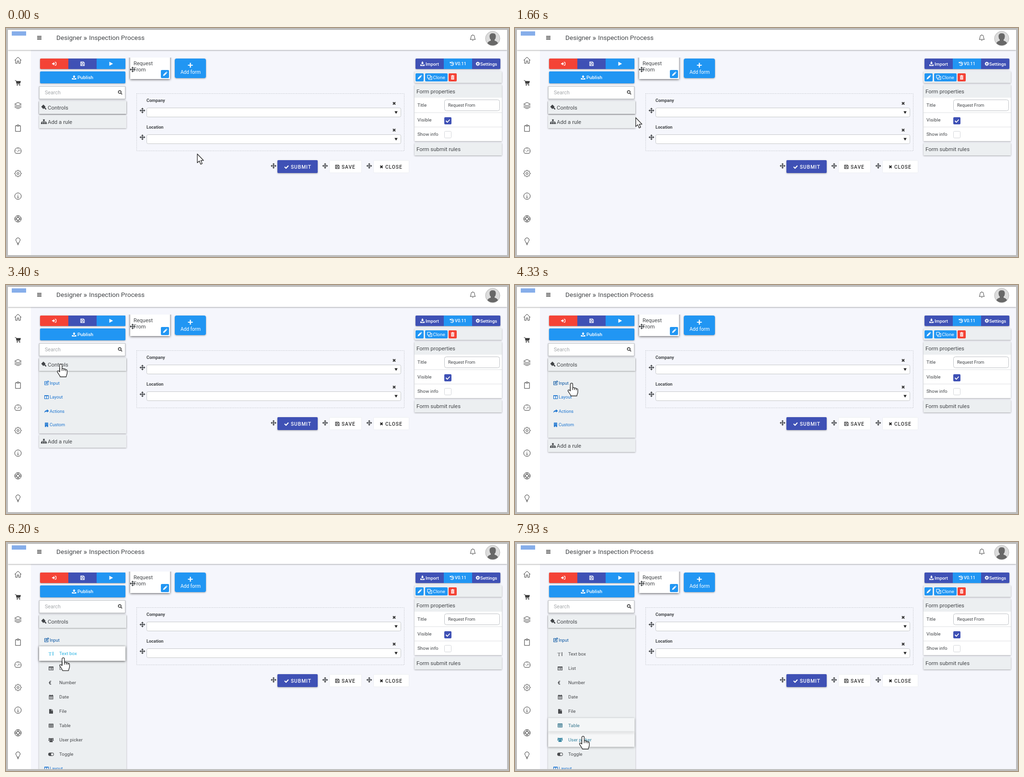
These frames come from a looping animation (1049 by 480 pixels, 8000 ms). An HTML page:

```html
<!DOCTYPE html>
<html lang="en">
<head>
<meta charset="utf-8">
<title>Form designer</title>
<style>
html, body { margin: 0; width: 100%; height: 100%; overflow: hidden; background: #bdbdbd; }
svg { display: block; width: 1049px; height: 480px; font-family: Roboto, sans-serif; }
.low { filter: drop-shadow(0 1px 1.5px #0005); }
.high { filter: drop-shadow(0 1px 2.5px #000a); }
</style>
</head>
<body>
<svg id="stage" viewBox="0 0 1049 480"></svg>
<script>
const RED = '#f44336', INDIGO = '#3f51b5', BLUE = '#2196f3', INK = '#424548', BAR = '#eceff1', LINK = '#1b74d0';

function gear(outer, inner, hole) {
  let d = '';
  for (let i = 0; i < 32; i++) {
    const a = (i - 0.5) * Math.PI / 16, r = i % 4 < 2 ? outer : inner;
    d += (i ? 'L' : 'M') + (r * Math.cos(a)).toFixed(2) + ' ' + (r * Math.sin(a)).toFixed(2);
  }
  return d + 'z' + ring(hole);
}
function ring(r, x = 0, y = 0) {
  return `M${x - r} ${y}a${r} ${r} 0 1 0 ${2 * r} 0a${r} ${r} 0 1 0 ${-2 * r} 0z`;
}

// Icon paths are centred on 0,0.
const icons = {
  move: 'M0-6l2.5 3h-1.7v2.2h2.2v-1.7l3 2.5-3 2.5v-1.7h-2.2v2.2h1.7l-2.5 3-2.5-3h1.7v-2.2h-2.2v1.7l-3-2.5 3-2.5v1.7h2.2v-2.2h-1.7z',
  cross: 'M-2.5-2.5l5 5m0-5l-5 5',
  plus: 'M-5 0h10M0-5v10',
  check: 'M-4 0l3 3 5-5.5',
  pencil: 'M-4 4l.8-3 5-5 2.2 2.2-5 5zM2.4-4.6l.9-.7 2 2-.7.9z',
  floppy: 'M-3.8-3.8h6l1.8 1.8v5.8h-7.8zM-2-3.8v2.6h3.6v-2.6M-2 3.8v-3h4v3',
  play: 'M-3.5-4.2L4.2 0-3.5 4.2z',
  enter: 'M-4.5-1h2.5v-2.5l3.8 3.5-3.8 3.5v-2.5h-2.5z',
  bracket: 'M1-3.4h1.5q1.5 0 1.5 1.5v3.8q0 1.5-1.5 1.5h-1.5',
  upload: 'M0-4.5l3 3.2h-1.8v2.8h-2.4v-2.8h-1.8zM-4.5 1.5h2.5v1.2h4v-1.2h2.5v3h-9z',
  download: 'M0 1.5l3-3.2h-1.8v-2.8h-2.4v2.8h-1.8zM-4.5 1.5h2.5v1.2h4v-1.2h2.5v3h-9z',
  history: 'M-3-2.4a3.7 3.7 0 1 1 0 4.8M-3.8-4v2.2h2.4M.2-2v2.3h2',
  cog: gear(4.6, 3.4, 1.5),
  clone: 'M-4.5-4.5h6v6h-6zM1.5-2h3v6.5h-6.5v-3',
  trash: 'M-3.7-3.7h2l.5-1h2.4l.5 1h2v1.2h-7.4zM-3-2h6v6.5h-6zM-1.3-.8v4h.7v-4zM.6-.8v4h.7v-4z',
  search: ring(2.9, -.8, -.8) + 'M1.5 1.5l2.6 2.6',
  gavel: 'M-5.5-1l4.5-4.5 4.5 4.5-1.2 1.2 3.2 3.5-1.6 1.6-3.4-3.4-1.6 2z',
  sitemap: 'M-1.7-5h3.4v3.2h-1.1v1.4h4.2v2h1.1v3.2h-3.4v-3.2h1.2v-1h-3.1v1h1.1v3.2h-3.4v-3.2h1.1v-1h-3.1v1h1.2v3.2h-3.4v-3.2h1.1v-2h4.2v-1.4h-1.1z',
  caret: 'M-3.2-2.5h6.4l-3.2 5.5z',
  edit: 'M1-3.3h-4.8v7h7v-3.5M-1.2 1.2l.3-1.8 4.1-4 1.5 1.5-4.1 4z',
  columns: 'M-4-3.5h8v7h-8zM-4-2.8h8M0-3.5v7',
  share: 'M1-4l4 3.4-4 3.4v-2q-4-.3-5.5 3 0-5.6 5.5-5.8z',
  building: 'M-3.4-4.5h6.8v9h-2.6v-2h-1.6v2h-2.6zM-2-3v1h1.2v-1zM.8-3v1h1.2v-1zM-2-.8v1h1.2v-1zM.8-.8v1h1.2v-1z',
  list: 'M-5-4h10v8h-10zM-4-1.8v4.8h8v-4.8zM-3.3-1h1.2v1h-1.2zM-1.3-1h4.5v1h-4.5zM-3.3 1h1.2v1h-1.2zM-1.3 1h4.5v1h-4.5z',
  date: 'M-4.5-3.7h1.5v-1.3h1.5v1.3h3v-1.3h1.5v1.3h1.5v8.4h-9zM-3.6-1.2v1.9h2v-1.9zM-1-1.2v1.9h2v-1.9zM1.6-1.2v1.9h2v-1.9zM-3.6 1.4v2.2h2v-2.2zM-1 1.4v2.2h2v-2.2zM1.6 1.4v2.2h2v-2.2z',
  file: 'M-4-4.8h4.5v3.2h3.5v6.4h-8zM1.3-4.8l2.7 2.5h-2.7z',
  table: 'M-4.5-3.7h9v7.4h-9zM-4.5-3h9M-4.5-1h9M-4.5 1.3h9M-1.5-3v6.7M1.5-3v6.7',
  users: ring(2.2, 0, -1.7) + ring(1.5, -3.7, -2.7) + ring(1.5, 3.7, -2.7) + 'M-3.4 4.5q-.3-4 2-4h2.8q2.3 0 2 4zM-5.6 1.5q-.2-2.6 1.4-2.6h1.8q.3 1-1.4 2.6zM5.6 1.5q.2-2.6-1.4-2.6h-1.8q-.3 1 1.4 2.6z',
  toggle: 'M-2.5-3.4h5a3.4 3.4 0 0 1 0 6.8h-5a3.4 3.4 0 0 1 0-6.8z' + ring(2.5, 2.4, 0),
  home: 'M-7 .5l7-7 7 7M-5-1v7.5h3.5v-5h3v5h3.5v-7.5',
  cart: 'M-6.5-5h2.3l1.8 7.3h6.5',
  basket: 'M-4-3.8h10l-1.4 5h-7.4z' + ring(1.2, -1.5, 4.5) + ring(1.2, 3.5, 4.5),
  layers: 'M0-6.5l7 3.6-7 3.6-7-3.6zM-7 .3l7 3.5 7-3.5M-7 3.2l7 3.5 7-3.5',
  board: 'M-2-5.2h-3.2v12h10.4v-12h-3.2M-2-6.8h4v2.6h-4z',
  gauge: 'M-4.5 5.4a6.8 6.8 0 1 1 9 0zM-1 2l4-4.5M-5-.5h1.4M0-5v1.4M3.6 0h1.4',
  settings: gear(7, 5.3, 2.2),
  info: ring(6.8) + 'M0-3.5v1.2M-1-.5h1v4M-1.3 3.5h2.6',
  buoy: ring(6.8) + ring(3) + 'M-1.5-6.5v4M1.5-6.5v4M-1.5 2.5v4M1.5 2.5v4M-6.5-1.5h4M-6.5 1.5h4M2.5-1.5h4M2.5 1.5h4',
  bulb: 'M-1.8 3.5q0-2-1.6-3.7a4.5 4.5 0 1 1 6.8 0q-1.6 1.7-1.6 3.7zM-1.8 5.2h3.6M-1 6.9h2',
  bell: 'M-5.5 3.5q1.8-1.5 1.8-5.5a3.7 3.7 0 0 1 7.4 0q0 4 1.8 5.5zM-1.3 5.3q1.3 1.3 2.6 0M0-5.8v-1',
  menu: 'M-4.5-3h9M-4.5 0h9M-4.5 3h9'
};

const rect = (x, y, w, h, fill, more = '') => `<rect x="${x}" y="${y}" width="${w}" height="${h}" fill="${fill}" ${more}/>`;
const text = (x, mid, size, str, fill = INK, more = '') =>
  `<text x="${x}" y="${mid + size * 0.355}" font-size="${size}" fill="${fill}" ${more}>${str}</text>`;
const icon = (name, x, y, color = INK, line = 0) =>
  `<path d="${icons[name]}" transform="translate(${x} ${y})" fill-rule="evenodd" ` +
  (line ? `fill="none" stroke="${color}" stroke-width="${line}" stroke-linejoin="round"/>` : `fill="${color}"/>`);
const clip = (id, x, y, w, h) => `<clipPath id="${id}">${rect(x, y, w, h, '#000', `id="${id}Box"`)}</clipPath>`;
const group = (id, body, more = '') => `<g id="${id}" ${more}>${body}</g>`;
const low = 'class="low"', medium = 'font-weight="500"', bold = 'font-weight="700"';
const spaced = medium + ' letter-spacing=".9"';

const sidebar = ['home', 'cart', 'layers', 'board', 'gauge', 'settings', 'info', 'buoy', 'bulb']
  .map((n, i) => icon(n, 25, 67.5 + i * 47.5, '#3a3a3a', 1)).join('') + icon('basket', 25, 115, '#3a3a3a');

const header = rect(4, 4, 1041, 42, '#fff', low) + rect(12, 7, 30, 9, '#86aeea') +
  icon('menu', 69.5, 20.5, '#333', 1.4) +
  text(105, 20.5, 13.6, 'Designer') + text(161.5, 20.5, 16, '»') + text(173.3, 20.5, 13.6, 'Inspection Process') +
  icon('bell', 973.5, 20.5, '#444', 1) +
  '<circle cx="1015" cy="22" r="15" fill="#dcdcdc" stroke="#b5b5b5"/>' +
  '<path d="M1004 32q1-4 7-5.500v-2q-3-3-2.500-8 .5-5.500 6.500-5.500t6.500 5.500q.5 5-2.500 8v2q6 1.500 7 5.500-4.500 4.500-11 4.500t-11-4.500z" fill="#686868"/>';

const tools = rect(71, 64, 178, 22, RED, 'rx="2" class="low"') + rect(130, 64, 60, 22, INDIGO) + rect(189, 64, 60, 22, BLUE, 'rx="1"') +
  icon('enter', 100.5, 75, '#fff') + icon('bracket', 100.5, 75, '#fff', 1.3) +
  icon('floppy', 159.5, 75, '#fff', 1.2) + icon('play', 219, 75, '#fff') +
  rect(71, 91, 178, 25, BLUE, 'rx="2" class="low"') + icon('upload', 142, 103.5, '#fff') + text(149, 103.5, 9.9, 'Publish', '#fff', medium) +
  rect(69.5, 122.5, 179, 26, '#fff', 'stroke="#c4c7ca" class="low"') + text(81, 135.5, 10.7, 'Search', '#a5a8ab') + icon('search', 238, 135, '#333', 1.5);

const card = `<g clip-path="url(#cards)">${rect(259, 55, 83, 52, '#fff', 'class="high"')}</g>` +
  text(266, 74.5, 11, 'Request') + text(266, 86.8, 11, 'From') + icon('move', 264, 87) +
  rect(323, 88, 17, 17, BLUE, 'rx="2"') + icon('pencil', 331.5, 96.5, '#fff') +
  rect(352, 64, 65, 41, BLUE, 'rx="4" class="low"') + icon('plus', 384.5, 78, '#fff', 2.2) + text(364, 92.5, 10.1, 'Add form', '#fff');

const field = (y, label, id) => text(293, y, 9.1, label, INK, bold) + icon('cross', 809.5, y + 6, '#333', 2) + icon('move', 284.5, y + 21) +
  rect(293.5, y + 15.5, 530, 19, '#fff', `id="${id}" rx="3" stroke="#c6c8cb"`) + icon('caret', 813.5, y + 25, '#222');
const form = rect(272.5, 137.5, 558, 120, 'none', 'stroke="#c9ccd2" stroke-dasharray="2 1.5"') +
  field(152, 'Company', 'company') + field(208, 'Location', 'location') +
  icon('move', 558, 289) + rect(566, 277, 84, 27, INDIGO, 'rx="2" class="low"') + icon('check', 585, 291, '#fff', 2) + text(594, 291, 10.3, 'SUBMIT', '#fff', spaced) +
  icon('move', 665.5, 289) + rect(674.5, 277.5, 67, 26, '#fff', 'rx="2" stroke="#eceef2"') + icon('floppy', 691, 291, '#333', 1.1) + text(700, 291, 10.3, 'SAVE', '#333', spaced) +
  icon('move', 757.5, 289) + rect(766.5, 277.500, 74, 26, '#fff', 'rx="2" stroke="#eceef2"') + icon('cross', 783, 291, '#222', 2) + text(791, 291, 10.3, 'CLOSE', '#333', spaced);

const properties = rect(854, 64, 177, 22, INDIGO, 'rx="2" class="low"') + rect(913, 64, 59, 22, BLUE) +
  icon('download', 868.5, 75, '#fff') + text(875, 75.2, 9.3, 'Import', '#fff', medium) +
  icon('history', 930, 75, '#fff', 1.3) + text(936, 75.2, 9.1, 'V0.11', '#fff', medium) +
  icon('cog', 984, 75, '#fff') + text(989, 75.2, 9.5, 'Settings', '#fff', medium) +
  rect(852, 91, 182, 24, BAR, low) +
  rect(854, 95, 17, 17, BLUE, 'rx="2"') + icon('pencil', 862.5, 103.5, '#fff') +
  rect(874, 95, 47, 17, BLUE, 'rx="2"') + icon('clone', 883.5, 103.5, '#fff', 1.1) + text(890.5, 103.7, 9.9, 'Clone', '#fff') +
  rect(923, 95, 17, 17, RED, 'rx="2"') + icon('trash', 931.5, 103.5, '#fff') +
  rect(852, 119, 182, 118, '#fff', low) + rect(852, 119, 182, 27, BAR) + text(856, 132.5, 11.4, 'Form properties') +
  rect(852, 177, 182, 1, '#dfe1e4') + rect(852, 207, 182, 1, '#dfe1e4') +
  text(858, 161.5, 9.9, 'Title') + rect(914.5, 150.5, 115, 23, '#fff', 'rx="4" stroke="#bfc2c6"') + text(922, 162, 9.15, 'Request From') +
  text(858, 192, 9.9, 'Visible') + rect(914, 187, 15, 15, INDIGO, 'rx="2"') + icon('check', 921.5, 194.500, '#fff', 1.8) +
  text(858, 222, 9.9, 'Show info') + rect(914.5, 216.5, 14, 14, '#fff', 'rx="2" stroke="#d4d6da"') +
  rect(852, 241, 182, 26, BAR, low) + text(856, 254, 11.4, 'Form submit rules');

const rows = [['', 'Text box'], ['list', 'List'], ['', 'Number'], ['date', 'Date'], ['file', 'File'], ['table', 'Table'], ['users', 'User picker'], ['toggle', 'Toggle']];
const rowMarkup = ([name, label], i) => {
  const y = 235 + i * 30, c = 'currentColor';
  const mark = i === 0 ? text(88.5, y, 11, 'T', c, 'font-family="Liberation Serif, serif"') + rect(97.3, y - 4, 1.3, 8, c)
    : i === 2 ? text(89, y, 10, '€', c, bold) : icon(name, 94, y, c, name === 'table' ? 1 : 0);
  return group('row' + i, rect(69, y - 15.5, 180, 30.5, '#fff', 'class="high" opacity="0"') + mark + text(111, y, 9.8, label, c));
};
const link = (y, name, label, line) => icon(name, 84.500, y, LINK, line) + text(91, y, 9.2, label, LINK);

const panel = rect(69, 153, 182, 27, BAR, 'id="sheet" class="low"') + rect(69, 153, 182, 27, BAR, low) +
  icon('gavel', 79, 166) + text(87, 166.5, 11.4, 'Controls') +
  `<g clip-path="url(#body)">` +
    group('input', icon('edit', 84.5, 205.5, 'currentColor', 1.1) + text(91, 205.8, 9.2, 'Input', 'currentColor')) +
    `<g clip-path="url(#items)">${rows.map(rowMarkup).join('')}</g>` +
    group('links', link(235, 'columns', 'Layout', 1.1) + link(264.5, 'share', 'Actions') + link(293, 'building', 'Custom')) +
  '</g>' +
  group('rule', rect(69, 183, 182, 27, BAR, low) + icon('sitemap', 79, 196.5) + text(87, 196.8, 11.4, 'Add a rule'));

const pointers = group('arrow', '<path d="M0 0V18.500L4.200 14.800 7 21.600 10.200 20.200 7.400 13.700H13z"/>') +
  group('hand', '<path d="M-2.600 2.500C-2.600-.8 2.400-.8 2.400 2.500V10.500C3 9 6 9 6.300 11 7.500 9.800 9.600 10.300 9.900 12.200 11.200 11.300 13 12 13 14V19C13 22 11 23.500 11 27H-1.500C-2 24-7 18.500-7.500 16.500-8 14-5 13.500-2.600 16.500z"/><path d="M2.400 10.500v4M6.300 11v3.500M9.900 12.200v2.800M-2.600 8v8"/>');

document.getElementById('stage').innerHTML =
  `<defs>${clip('cards', 250, 62, 100, 60)}${clip('body', 60, 180, 200, 0)}${clip('items', 60, 215, 200, 0)}</defs>` +
  rect(0, 0, 1049, 480, '#bdbdbd') + rect(4, 4, 1041, 472, '#f5f6fc') + rect(4, 46, 48, 430, '#fff') +
  sidebar + header + tools + card + form + properties + panel +
  rect(2, 2, 1045, 476, 'none', 'stroke="#bdbdbd" stroke-width="4"') +
  group('pointer', pointers, 'fill="#fff" stroke="#2a2a2a" stroke-width="1.3" stroke-linejoin="round"');

const $ = id => document.getElementById(id);
const set = (el, name, value) => el.setAttribute(name, value);

// Pointer path: time, x, y
const path = [
  [0, 399, 264], [140, 399, 264], [260, 391, 250], [470, 391, 250], [660, 394, 259], [800, 394, 259],
  [1060, 358, 238], [1660, 252, 188], [2100, 172, 157], [2460, 114.5, 165.5], [3550, 114.5, 165.5],
  [4000, 118, 190], [4330, 118, 205.5], [4600, 120, 208], [5600, 120, 208], [5850, 119, 228],
  [6200, 119.5, 242.5], [6300, 120, 254], [6460, 122, 260], [6960, 130, 318], [7260, 133, 339.5],
  [7330, 134, 344], [7650, 138, 378], [7780, 140, 399.9], [7930, 142, 407], [8001, 142, 407]
];
function pointerAt(t) {
  const i = path.findIndex(k => k[0] > t), [t0, x0, y0] = path[i - 1], [t1, x1, y1] = path[i];
  const p = (t - t0) / (t1 - t0);
  return [x0 + (x1 - x0) * p, y0 + (y1 - y0) * p];
}

// CSS "ease" curve over 350 ms
function ease(t, start) {
  const p = Math.min(1, Math.max(0, (t - start) / 350));
  let lo = 0, hi = 1, u;
  for (let i = 0; i < 20; i++) {
    u = (lo + hi) / 2;
    if (0.75 * u * (1 - u) + u ** 3 < p) lo = u; else hi = u;
  }
  return p === 0 ? 0 : p === 1 ? 1 : 0.3 * u * (1 - u) ** 2 + 3 * u * u * (1 - u) + u ** 3;
}

function rowAt(t) {
  if (t < 5400) return -1;
  return Math.floor((pointerAt(t)[1] - 220) / 30);
}
// Share of the last 270 ms spent over a row, which gives its linear fade.
function glow(row, t) {
  let n = 0;
  for (let i = 0; i < 27; i++) n += rowAt(t - i * 10) === row;
  return n / 27;
}

function draw(t) {
  const open = ease(t, 3160), more = ease(t, 4960);
  const grow = 140 * open + 240 * more;
  set($('sheet'), 'height', 27 + grow);
  set($('bodyBox'), 'height', grow);
  set($('itemsBox'), 'height', more && 245 * more);
  set($('links'), 'transform', `translate(0 ${240 * more})`);
  set($('rule'), 'transform', `translate(0 ${grow})`);
  $('input').style.color = t > 4180 ? '#0b57a4' : LINK;

  rows.forEach((_, i) => {
    const g = glow(i, t), row = $('row' + i);
    const mix = (a, b) => Math.round(a + (b - a) * g);
    set(row.firstChild, 'opacity', g);
    set(row, 'transform', `translate(0 ${-g})`);
    row.style.color = `rgb(${mix(72, 38)},${mix(74, 178)},${mix(77, 226)})`;
  });

  const [x, y] = pointerAt(t);
  const onField = x > 293 && x < 823 && y > 223 && y < 243;
  const onBar = x < 251 && (y > 152 && y < 181 || t < 3160 && y > 182 && y < 210);
  const onLink = t > 3900 && y > 198 && y < 214 && x < 251;
  const hand = onField || onBar || onLink || rowAt(t) >= 0;
  set($('location'), 'fill', onField ? '#e8e8e9' : '#fff');
  $('hand').style.display = hand ? '' : 'none';
  $('arrow').style.display = hand ? 'none' : '';
  set($('pointer'), 'transform', `translate(${x} ${y})`);
}

const began = performance.now();
function tick() {
  draw((performance.now() - began) % 8000);
  requestAnimationFrame(tick);
}
tick();
</script>
</body>
</html>
```
